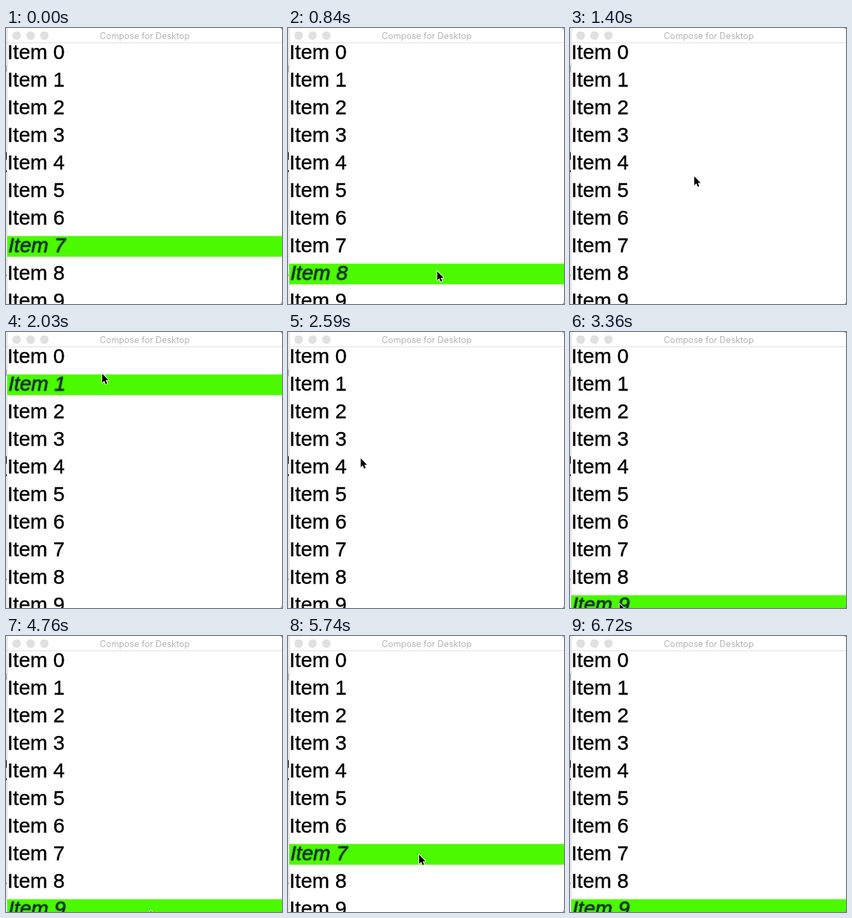
These frames come from a looping animation (402 by 400 pixels, 7.35 s). An HTML page:

```html
<!DOCTYPE html>
<html lang="en">
<head>
<meta charset="utf-8">
<title>Hover list</title>
<style>
  html, body { margin: 0; width: 100%; height: 100%; overflow: hidden; background: #fff; }
  svg { display: block; width: 402px; height: 400px; }
  .title { font: 12.7px Inter, Roboto, sans-serif; fill: #b4b4b4; text-anchor: middle; }
  .row text { font: 30px "Liberation Sans", Arial, sans-serif; fill: #000; stroke: #000; stroke-width: .4px; }
  .row rect { fill: #4cfa00; visibility: hidden; }
  .row.hover rect { visibility: visible; }
  .row.hover text {
    font-style: italic; fill: #123328; stroke: #123328;
    transform: translateX(1.5px);
    filter: drop-shadow(.5px .5px 1px rgba(20, 40, 90, .6));
  }
</style>
</head>
<body>
<svg viewBox="0 0 402 400">
  <rect width="402" height="400" fill="#fff"/>
  <g id="rows"></g>
  <rect x="1" width="401" height="21" fill="#fff"/>
  <path d="M1 21.5H402" stroke="#dedede"/>
  <g id="buttons" fill="#e0e0e0"></g>
  <text class="title" x="202" y="16">Compose for Desktop</text>
  <rect width="1" height="400" fill="#fafafa"/>
  <path d="M1.5 0V400" stroke="#cfcfcf"/>
  <path d="M.5 54V64M.5 357V360" stroke="#b0b0b0"/>
  <path d="M.5 180V191M.5 206V209" stroke="#111"/>
  <path d="M402 0H398Q402 0 402 4ZM402 400H398Q402 400 402 396Z" fill="#999"/>
  <path id="cursor" d="M0 0V13L3 10.3L5 15L7.2 14L5.2 9.4H9.2Z"
        fill="#000" stroke="#fff" stroke-width="2" stroke-linejoin="round" paint-order="stroke"/>
</svg>
<script>
const LOOP = 7350, STEP = 70, HOVER_LAG = 16, HEIGHT = 400;
const ROW_TOP = 21.5, ROW_PITCH = 40, ROW_HEIGHT = 30, ROW_COUNT = 10;

const linear = u => u;
const easeOut = u => 1 - (1 - u) ** (4 / 3);
const smooth = u => u * u * (3 - 2 * u);

// The pointer rests between moves and is outside the window when y >= HEIGHT.
const origin = { x: 231, y: 404 };
const moves = [
  { from: 630, to: 2170, x: 131, y: 26, ease: linear },
  { from: 2170, to: 3430, x: 71, y: 402, ease: easeOut },
  { from: 3430, to: 4690, x: 212, y: 402, ease: linear },
  { from: 4690, to: 5110, x: 191, y: 347, ease: smooth },
  { from: 5460, to: 5740, x: 191, y: 317, ease: smooth },
  { from: 5740, to: 6020, x: 190, y: 392, ease: smooth },
  { from: 6020, to: 6230, x: 190, y: 367, ease: smooth },
  { from: 6510, to: 6720, x: 190, y: 402, ease: smooth }
];

function pointerAt(t) {
  let { x, y } = origin;
  for (const move of moves) {
    if (t <= move.from) break;
    const k = move.ease(Math.min(1, (t - move.from) / (move.to - move.from)));
    x += (move.x - x) * k;
    y += (move.y - y) * k;
  }
  return { x, y };
}

// Leaving the window keeps the last row lit.
function hoveredRow(t) {
  const { y } = pointerAt(t);
  if (y >= HEIGHT) return t < moves[0].to ? 7 : 9;
  const offset = y - ROW_TOP, row = Math.floor(offset / ROW_PITCH);
  return offset - row * ROW_PITCH <= ROW_HEIGHT ? row : -1;
}

function svg(tag, attrs, parent) {
  const node = document.createElementNS("http://www.w3.org/2000/svg", tag);
  for (const name in attrs) node.setAttribute(name, attrs[name]);
  return parent.appendChild(node);
}

const buttons = document.getElementById("buttons");
for (let i = 0; i < 3; i++) svg("circle", { cx: 15.5 + 20.2 * i, cy: 11, r: 6.2 }, buttons);

const rowLayer = document.getElementById("rows");
const rows = Array.from({ length: ROW_COUNT }, (_, i) => {
  const y = ROW_TOP + i * ROW_PITCH;
  const row = svg("g", { class: "row" }, rowLayer);
  svg("rect", { x: 1, y, width: 401, height: ROW_HEIGHT }, row);
  svg("text", { x: 2, y: y + 23.5 }, row).textContent = "Item " + i;
  return row;
});
const cursor = document.getElementById("cursor");

function render(time) {
  const t = Math.floor((time % LOOP) / STEP) * STEP;
  const { x, y } = pointerAt(t);
  const lit = hoveredRow(t - HOVER_LAG);
  rows.forEach((row, i) => row.classList.toggle("hover", i === lit));
  cursor.setAttribute("transform", `translate(${x.toFixed(1)} ${y.toFixed(1)})`);
  cursor.setAttribute("visibility", y < HEIGHT ? "visible" : "hidden");
}

const start = performance.now();
function tick() {
  render(performance.now() - start);
  requestAnimationFrame(tick);
}
tick();
</script>
</body>
</html>
```
